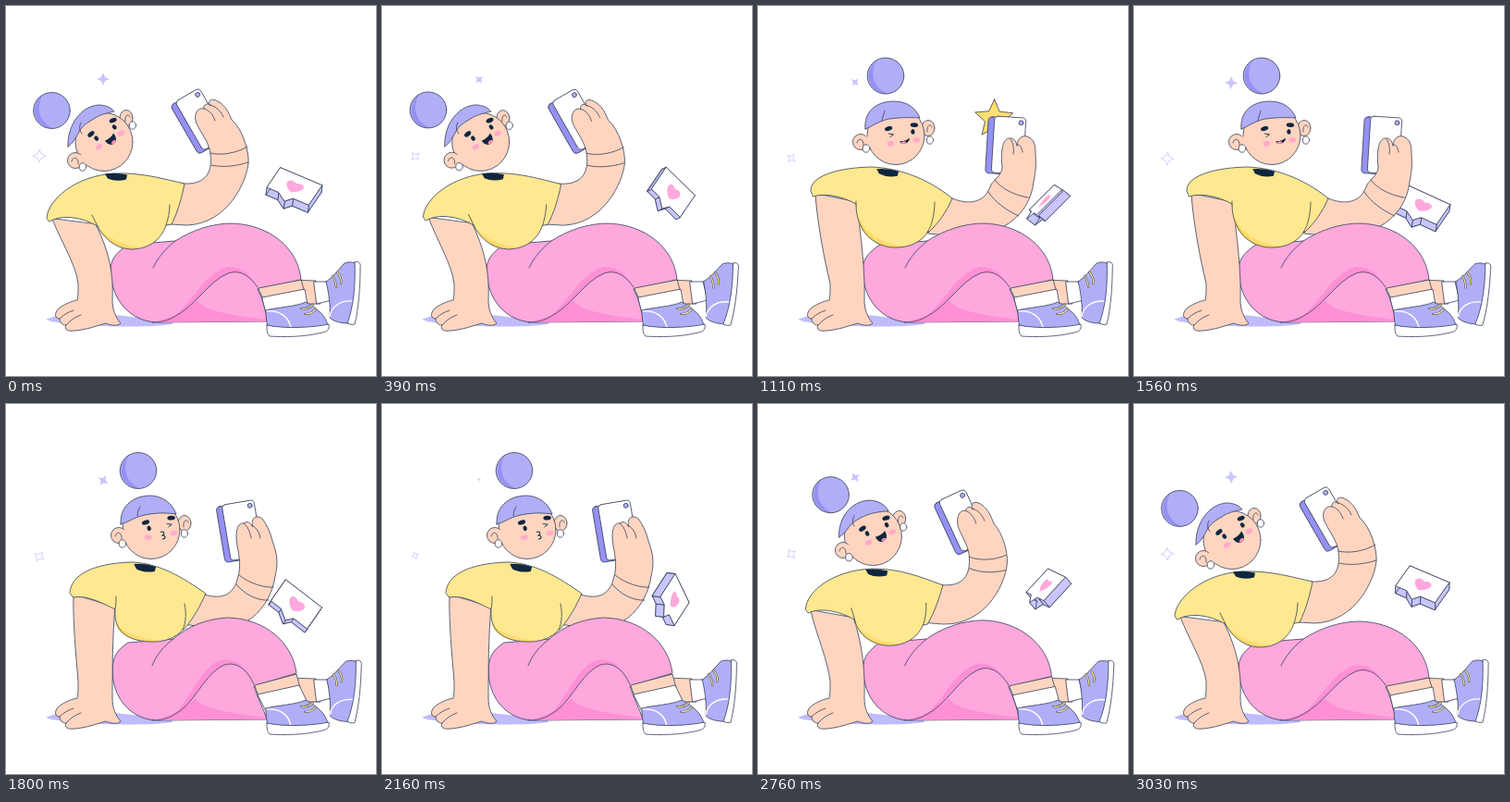
Write an HTML page with a canvas that moves like this. It is 400 by 400 pixels and loops after 3.06 s.

```html
<!DOCTYPE html>
<html lang="en">
<head>
<meta charset="utf-8">
<title>Selfie time</title>
<style>
html, body { margin: 0; width: 100%; height: 100%; overflow: hidden; background: #fff; }
canvas { display: block; width: 400px; height: 400px; }
</style>
</head>
<body>
<canvas id="stage"></canvas>
<script>
const LOOP = 3060, SPIN = LOOP / 2, TAU = Math.PI * 2;
const INK = '#35405a', NAVY = '#10263f', SKIN = '#ffd5c0', WHITE = '#fff';
const YELLOW = '#ffe88f', GOLD = '#ffdb6a', PINK = '#ffa8dd', ROSE = '#ff90d5';
const LILAC = '#b1aef8', VIOLET = '#9591f3', PALE = '#c8c5ff';

const canvas = document.getElementById('stage');
const ctx = canvas.getContext('2d');
const dpr = window.devicePixelRatio || 1;
canvas.width = canvas.height = 400 * dpr;

let now = 0;

const lerp = (a, b, p) => a + (b - a) * p;
const wave = phase => (1 - Math.cos(phase * TAU)) / 2;
const ease = (from, to) => {
  const x = Math.min(1, Math.max(0, (now - from) / (to - from)));
  return x < .5 ? 4 * x ** 3 : 1 - 4 * (1 - x) ** 3;
};

// Three poses: leaning back, wink, kiss. Each part starts with its own delay.
function blend(part) {
  if (now < 1560) return [0, 1, ease(part.start, part.end)];
  if (now < 2300) return [1, 2, ease(1565, 1805)];
  return [2, 0, ease(part.back, 3030)];
}
const BODY = { start: 200, end: 1080, back: 2390 };
const HEAD = { start: 260, end: 1090, back: 2430 };
const ARM = { start: 280, end: 1100, back: 2350 };
const BUN = { start: 300, end: 1110, back: 2400 };

// Blends the numbers of two path strings with the same commands.
function mix(part, poses) {
  const [i, j, p] = blend(part);
  const to = poses[j].match(/-?[\d.]+/g);
  let k = 0;
  return poses[i].replace(/-?[\d.]+/g, n => lerp(+n, +to[k++], p).toFixed(2));
}
function mixNums(part, poses) {
  const [i, j, p] = blend(part);
  return poses[i].map((n, k) => lerp(n, poses[j][k], p));
}

function shape(d, fill, stroke = INK, width = .8) {
  const path = d instanceof Path2D ? d : new Path2D(d);
  if (fill) { ctx.fillStyle = fill; ctx.fill(path); }
  if (stroke) { ctx.strokeStyle = stroke; ctx.lineWidth = width; ctx.stroke(path); }
}
const line = (d, color = INK, width = .8) => shape(d, null, color, width);
function oval(x, y, rx, ry, fill, stroke = null, tilt = 0) {
  const path = new Path2D();
  path.ellipse(x, y, rx, ry, tilt, 0, TAU);
  shape(path, fill, stroke);
}
function placed(x, y, turn, draw) {
  ctx.save();
  ctx.translate(x, y);
  ctx.rotate(turn * Math.PI / 180);
  draw();
  ctx.restore();
}

const arm = [
  'M176 194 L192 192 C212 193 224 184 221 160 C220 148 211 138 206 127 C202 118 207 109 214 111 C213 106 219 104 221 108 C217 102 222 99 229 103 C238 108 241 116 244 123 C256 133 263 158 262 170 C260 190 240 235 196 237 L178 236 Z',
  'M190 208 L210 208 C230 216 246 212 252 193 C257 186 264 182 264 174 C262 160 264 144 271 143 C276 142 279 146 280 151 C280 143 287 138 293 142 C299 145 300 152 300 160 C301 172 300 180 298 190 C294 226 262 254 205 248 L184 246 Z',
  'M195 205 L215 206 C234 212 247 206 251 186 C254 176 252 166 251 158 C247 142 249 128 257 129 C261 126 264 128 267 133 C264 124 270 119 277 124 C283 132 286 140 288 148 C294 164 294 174 291 186 C286 220 258 252 212 241 L192 238 Z'
];
const armLines = [
  'M214 111 C219 112 224 117 226 124 M221 107 C228 109 233 115 235 120 M221 159 C232 162 250 159 261 152 M222 172 C234 175 250 173 262 169',
  'M273 144 C276 148 277 154 276 160 M280 151 C282 148 285 152 286 158 M256 188 C262 197 278 205 292 207 M249 201 C256 212 270 222 282 227',
  'M257 129 C261 132 264 138 265 145 M267 132 C271 134 274 139 275 145 M252 185 C262 193 278 199 289 198 M249 195 C258 206 272 213 284 212'
];
const torso = [
  'M44 229 C45 210 75 183 118 181 C148 180 170 187 193 192 C190 207 186 222 179 236 L173 237 C168 252 155 263 135 263 C116 262 104 248 99 238 C82 228 60 225 47 233 Z',
  'M57 200 C56 184 85 175 122 174 C152 175 183 186 210 208 C204 222 195 235 184 245 L184 243 C178 255 163 262 146 261 C126 260 106 244 106 214 C90 205 70 202 60 206 Z',
  'M69 204 C70 184 96 172 136 171 C166 172 192 188 216 205 C210 218 203 231 193 243 L191 244 C184 253 170 258 155 257 C132 256 116 246 118 222 C104 215 86 206 73 209 Z'
];
const torsoShade = [
  'M99 238 C104 248 116 262 135 263 C139 263 143 262 147 261 C125 259 108 250 99 238 Z',
  'M106 222 C108 246 126 260 146 261 C150 261 154 261 158 260 C134 257 114 246 106 222 Z',
  'M118 236 C120 248 135 256 155 257 C159 257 163 257 167 256 C144 253 126 248 118 236 Z'
];
const torsoLines = [
  'M99 238 C97 234 95 230 93 226 M177 215 C177 223 175 231 173 237',
  'M106 214 C106 213 106 212 106 211 M191 212 C191 224 188 237 184 243',
  'M118 222 C119 217 119 212 119 208 M193 216 C195 226 195 236 191 244'
];
const hand = ' C78 308 78 314 77 318 C70 319 60 324 56 328 C52 333 53 338 58 338 C58 342 61 345 65 345 C62 350 68 352 74 351 C88 350 100 345 108 343 C114 346 122 346 124 343 C118 336 115 328 115 318 ';
const prop = [
  'M50 230 C58 252 76 280 78 300' + hand + 'C116 295 114 270 97 236 Z',
  'M62 203 C64 235 72 275 78 300' + hand + 'C116 290 112 250 106 212 Z',
  'M73 206 C72 235 76 275 78 300' + hand + 'C115 290 115 250 118 220 Z'
];
const seated = (rest, lifted) => [rest, rest, lifted];
const pants = seated(
  'M113 285 C113 273 121 265 132 258 L183 254 C200 243 222 235 244 235 C285 236 316 262 319 296 L272 306 C278 318 282 330 282 341 L165 342 C135 342 113 318 113 285 Z',
  'M115 288 C115 273 121 265 132 258 L181 254 C196 240 218 232 240 231 C280 232 310 258 314 291 L268 305 C272 318 279 330 282 341 L165 342 C135 342 115 318 115 288 Z');
// Underside of the upper thigh, then the floor side of the lower leg.
const pantsShade = seated(
  'M272 304 C262 290 252 285 240 289 C218 298 205 325 180 337 C200 322 210 296 234 284 C250 278 263 288 272 304 Z M160 342 C185 335 198 326 207 318 C212 329 242 334 281 339 L282 341 Z',
  'M268 303 C260 285 246 276 232 284 C212 296 204 325 180 337 C198 322 206 292 227 279 C245 270 260 284 268 303 Z M160 342 C185 335 196 326 205 318 C210 329 242 334 281 339 L282 341 Z');
const pantsLines = seated(
  'M272 304 C262 290 252 285 240 289 C218 298 205 325 180 337 C172 341 165 342 158 342 M183 254 C173 262 164 272 159 283',
  'M268 303 C260 285 246 276 232 284 C212 296 204 325 180 337 C172 341 165 342 158 342 M181 254 C170 262 162 272 158 283');
const shin = seated('M273 305 L319 296 L323 310 L279 318 Z', 'M269 304 L314 292 L318 307 L274 317 Z');
const sock = seated('M277 315 L323 306 L326 323 L281 331 Z', 'M272 314 L317 304 L326 323 L281 331 Z');
const hair = [
  'M67 152 C66 128 82 108 100 107 C108 107 114 110 117 114 C108 116 100 118 95 122 C88 126 82 130 79 136 C76 142 72 149 67 152 Z',
  'M116 133 C114 114 128 103 147 103 C162 103 171 111 175 121 C162 120 150 121 142 122 C136 123 130 126 126 128 C122 130 119 132 116 133 Z',
  'M124 130 C123 111 136 100 155 99 C170 99 180 108 184 119 C170 117 160 118 150 120 C144 121 138 124 134 126 C130 128 127 129 124 130 Z'
];
const parting = [
  'M82 138 C79 134 79 130 81 126',
  'M134 124 C135 120 136 116 137 113',
  'M142 121 C142 118 143 114 145 111'
];

function star(x, y, points, outer, inner, turn, fill, stroke) {
  const path = new Path2D();
  for (let i = 0; i < points * 2; i++) {
    const r = i % 2 ? inner : outer, a = turn + i * Math.PI / points;
    path.lineTo(x + r * Math.sin(a), y - r * Math.cos(a));
  }
  path.closePath();
  shape(path, fill, stroke);
}

function sparkles(bob) {
  const phase = now / SPIN, glow = 1 - wave(phase), turn = phase * Math.PI;
  const big = Math.max(0, 9 * glow ** .3 - 2), small = 3.5 + 3.5 * glow;
  star(105, 79 + bob * 4, 4, big, big * .42, turn, PALE, null);
  star(36, 162 + bob * 3, 4, small, small * .42, turn, WHITE, PALE);
}

// Speech bubble: phase, centre, half width, half height and depth vectors.
const bubbleKeys = [
  [0, 312, 195, 22.5, 9.5, -7.3, 10.7, -1, 8],
  [.176, 314, 198, 19.5, 15, -8, 11.5, -2.5, 4],
  [.451, 317, 199, 5.5, 15.5, -8, 12.5, -10, -2],
  [.55, 314, 198, -16, -8, -10, 13, -4, -6],
  [.667, 312, 192, -1, 0, -12.8, 16.8, 8, 6],
  [.725, 311, 193, 4, 2.5, -13.5, 13.5, 9, 7],
  [1, 312, 195, 22.5, 9.5, -7.3, 10.7, -1, 8]
];
const bubbleFace = [[-1, -1], [1, -1], [1, 1], [.25, 1], [0, 1.5], [-.45, 1], [-1, 1]];

function bubble(bob) {
  const phase = now / SPIN % 1;
  const n = bubbleKeys.findIndex(k => k[0] > phase);
  const a = bubbleKeys[n - 1], b = bubbleKeys[n];
  const p = (phase - a[0]) / (b[0] - a[0]);
  const [, cx, y, ux, uy, vx, vy, wx, wy] = a.map((v, i) => lerp(v, b[i], p));
  const cy = y + bob * 20;
  const front = bubbleFace.map(([s, t]) => [cx + ux * s + vx * t, cy + uy * s + vy * t]);
  const back = front.map(([px, py]) => [px + wx, py + wy]);
  const poly = (pts, fill) => shape('M' + pts.map(q => q.join(' ')).join('L') + 'Z', fill);
  const facing = ux * vy - uy * vx > 0;
  poly(facing ? back : front, PALE);
  front.forEach((q, i) => {
    const k = (i + 1) % front.length;
    poly([q, front[k], back[k], back[i]], PALE);
  });
  poly(facing ? front : back, facing ? WHITE : PALE);
  if (!facing) return;
  ctx.save();
  ctx.transform(ux, uy, vx, vy, cx, cy);
  shape('M0 .58 C-.62 .1 -.4 -.65 0 -.27 C.4 -.65 .62 .1 0 .58Z', PINK, null);
  ctx.restore();
}

function phone() {
  const [x, y, turn, w] = mixNums(ARM, [[211, 122.5, -30, 30], [271, 150.5, 3.5, 34], [255.5, 136.5, -9.5, 35]]);
  placed(x, y, turn, () => {
    const slab = (dx, dy, fill) => {
      const path = new Path2D();
      path.roundRect(-w / 2 + dx, -30.5 + dy, w, 61, 4);
      shape(path, fill);
    };
    slab(-6.5, 1, VIOLET);
    slab(0, 0, WHITE);
    oval(w / 2 - 5, -25, 2.5, 2.5, LILAC, INK);
  });
}

function farFoot() {
  shape('M305 296 L335 297 L340 322 L320 322 Z', SKIN);
  shape('M333 298 L347 298 L352 318 L336 322 Z', WHITE);
  placed(350, 340, 2.6 * wave(now / (LOOP / 3)), () => {
    ctx.translate(-350, -340);
    shape('M346 298 C355 292 360 284 366 278 C372 276 376 277 378 279 C380 300 376 325 370 343 C362 343 354 341 350 337 C351 324 349 310 346 298Z', LILAC);
    line('M350 336 C351 325 362 318 374 319', WHITE, 1.4);
    shape('M377 277 C381 275 384 278 383 283 C383 305 381 328 377 344 C374 345 372 344 369 343 C376 325 378 300 377 277Z', WHITE);
    const laces = 'M353 292 C355 295 357 299 357 304 M358 288 C361 291 363 295 362 300';
    line(laces, INK, 2.2);
    line(laces, YELLOW, 1.2);
  });
}

function nearFoot() {
  shape(mix(BODY, shin), SKIN);
  shape(mix(BODY, sock), WHITE);
  shape('M281 329 C290 326 315 325 324 320 C335 326 346 334 348 346 C330 348 300 350 283 346 C281 340 281 334 281 329Z', LILAC);
  line('M282 330 C296 329 306 336 308 348', WHITE, 1.4);
  shape('M282 345 C300 349 330 348 349 344 C350 350 347 352 342 353 C322 358 300 358 285 357 C282 354 282 350 282 345Z', WHITE);
  const laces = 'M319 327 C323 328 328 326 332 323 M323 333 C327 333 331 332 335 328';
  line(laces, INK, 2.2);
  line(laces, YELLOW, 1.2);
}

function face() {
  const [x, y, turn] = mixNums(HEAD, [[107.5, 137, -32], [156, 137.5, -8], [166, 132.5, -10]]);
  const mood = now < 560 || now >= 2760 ? 'happy' : now < 1680 ? 'wink' : 'kiss';
  placed(x, y, turn, () => {
    for (const side of [-1, 1]) {
      oval(14 * side, 9.5, 4, 2.8, '#ffaccb');
      oval(14 * side, -7, 4.2, 2.4, NAVY, null, side * .15);
      const closed = mood === 'wink' && side < 0 || mood === 'kiss' && side > 0;
      if (closed) line(`M${11.5 * side - 3} -1.5 L${11.5 * side + 2} 0 L${11.5 * side - 2} 2`, NAVY, .8);
      else oval(11.5 * side, 0, 2.1, 2.8, NAVY);
    }
    if (mood === 'happy') {
      shape('M-5 7 C-1 8 4 7 7 5 C8 11 5 15 1 15 C-3 15 -5 11 -5 7Z', NAVY, null);
      shape('M-1 14 C0 11 4 11 5 13 C3 15.5 1 15.5 -1 14Z', '#ff8fb4', null);
    } else if (mood === 'wink') {
      shape('M-4 8 C-1 9.5 4 8.5 7 6 C7 9 4 11.5 1 11.5 C-2 11.5 -4 10 -4 8Z', NAVY, null);
      shape('M-3 10 C-1 8.5 3 9 3 11 C1 12 -2 11.5 -3 10Z', '#ff9fc0', null);
    } else {
      line('M0 6 C4 5 5 9 1 10 C5 10 5 14 1 14', NAVY, 1);
    }
  });
}

function head() {
  const [cx, cy, lx, ly, rx, ry] = mixNums(HEAD, [
    [106, 147, 75, 167, 130, 121], [149, 140, 111, 147, 184, 132], [157, 136, 122, 142, 193, 129]]);
  const [ax, ay, bx, by] = mixNums(HEAD, [[83, 174, 137, 129], [117, 154, 186, 145], [126, 151, 193, 140]]);
  oval(rx, ry, 7, 8.5, SKIN, INK);
  line(`M${rx - 1} ${ry + 4} C${rx - 2} ${ry - 4} ${rx + 3} ${ry - 5} ${rx + 4} ${ry - 1}`);
  oval(cx, cy, 31, 31.5, SKIN, INK);
  shape(mix(HEAD, hair), LILAC);
  line(mix(HEAD, parting));
  oval(lx, ly, 8.5, 8.5, SKIN, INK);
  oval(lx + 6, ly + 1, 6, 7, SKIN);
  line(`M${lx - 4} ${ly + 1} C${lx - 3} ${ly - 5} ${lx + 4} ${ly - 4} ${lx + 3} ${ly + 4}`);
  oval(ax, ay, 3.8, 4.2, WHITE, INK);
  oval(bx, by, 3.6, 4.2, WHITE, INK);
  face();
}

function bun() {
  const [x] = mixNums(BUN, [[49.5], [138], [143]]);
  const [y] = mixNums(HEAD, [[113], [75.5], [72]]);
  oval(x, y, 19.8, 19.5, LILAC);
  shape(`M${x - 10} ${y - 17} C${x - 24} ${y - 5} ${x - 20} ${y + 18} ${x + 2} ${y + 19.4} C${x - 13} ${y + 13} ${x - 18} ${y - 2} ${x - 10} ${y - 17}Z`, VIOLET, null);
  oval(x, y, 19.8, 19.5, null, INK);
}

function draw(t) {
  now = t % LOOP;
  ctx.setTransform(dpr, 0, 0, dpr, 0, 0);
  ctx.fillStyle = WHITE;
  ctx.fillRect(0, 0, 400, 400);
  ctx.lineJoin = ctx.lineCap = 'round';
  const bob = wave(now / LOOP);

  shape('M43 339 C60 331 80 330 110 333 L180 341 L180 344 C150 349 60 346 43 339Z', '#bfbcfd', null);
  sparkles(bob);
  bubble(bob);
  if (now > 990 && now < 1260) {
    const pop = Math.min(1, 1.2 * Math.sin((now - 990) / 270 * Math.PI));
    star(255, 122, 5, 21.5 * pop, 10 * pop, .02, '#ffdf70', INK);
  }
  phone();
  shape(mix(ARM, arm), SKIN);
  line(mix(ARM, armLines));

  farFoot();
  shape(mix(BODY, pants), PINK);
  shape(mix(BODY, pantsShade), ROSE, null);
  line(mix(BODY, pantsLines));
  nearFoot();

  shape(mix(BODY, prop), SKIN);
  line('M58 338 C62 334 67 331 73 329 M65 345 C69 340 75 336 81 334');
  shape(mix(BODY, torso), YELLOW, null);
  shape(mix(BODY, torsoShade), GOLD, null);
  line(mix(BODY, torso));
  line(mix(BODY, torsoLines));
  const [nx, ny, tilt] = mixNums(BODY, [[119, 184.5, 0], [140, 180, 4], [150, 177, 5]]);
  placed(nx, ny, tilt, () => shape('M-12 -3 Q0 -5 12 -2 L11 3 Q0 6 -9 2Z', NAVY, null));
  bun();
  head();
}

const begin = performance.now();
function tick() {
  draw(performance.now() - begin);
  requestAnimationFrame(tick);
}
tick();
</script>
</body>
</html>
```
